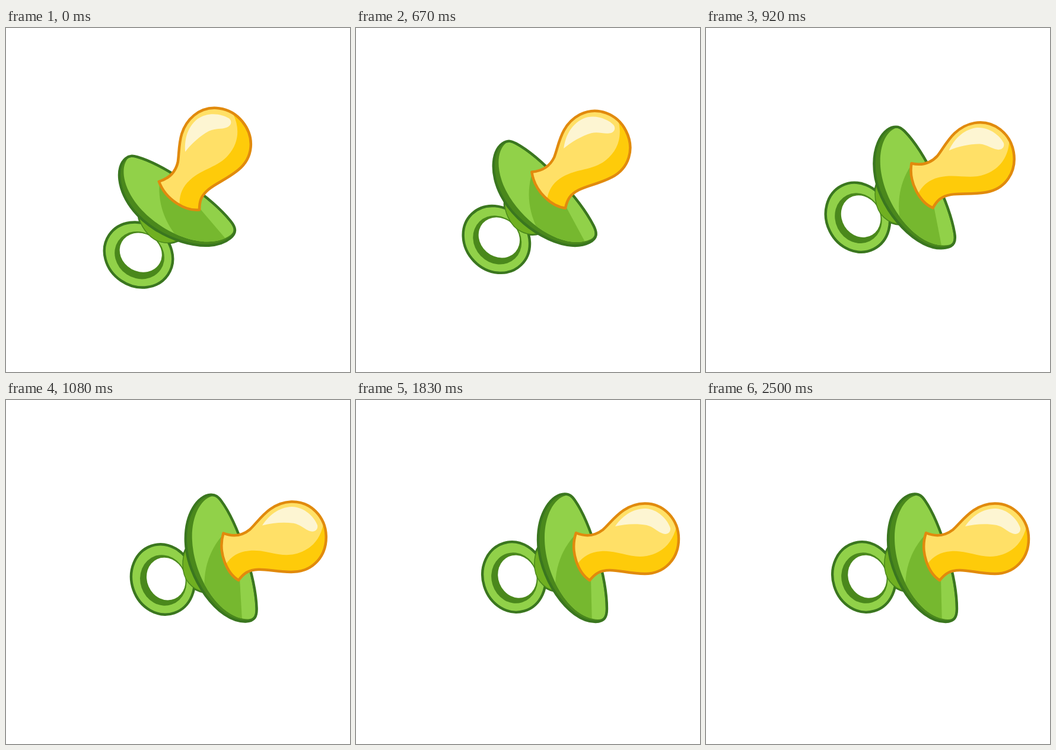
These frames come from a looping animation (580 px wide and 580 px high, 2540 ms). An HTML page:

```html
<!DOCTYPE html>
<html lang="en">
<head>
<meta charset="utf-8">
<title>Pacifier</title>
<style>
  html, body { margin: 0; width: 100%; height: 100%; overflow: hidden; background: #fff; }
  svg { display: block; width: 100vw; height: 100vh; }
  .line { fill: none; stroke: #3a761f; stroke-width: 4.4; stroke-linejoin: round; }
  .light { fill: #91d149; }
  .mid { fill: #76b82f; }
  .dark { fill: #4a881c; }
</style>
</head>
<body>
<svg viewBox="0 0 580 580">
  <defs>
    <path id="face" d="M354 161 C333 166 318 196 318 232 C318 296 360 368 408 370 C418 370 421 364 421 352 C421 300 395 209 367 170 C363 164 360 161 354 161Z"/>
    <path id="plate" d="M352 158.5 C360 158.5 364 162 369 169 C396 208 423 300 423 352 C423 366 419 374 404 374 C356 374 307 296 307 236 C307 190 330 158.5 352 158.5Z"/>
    <path id="teat" d="M371 224 C388 231 403 229 416 219 C432 205 450 175 487 174.5 C520 174.5 544 202 544 234 C544 268 520 293 487 293 C462 293 445 287 428 287 C411 287 403 293 394 304 C375 292 360 256 371 224Z"/>
    <path id="neck" d="M312 243 C298 258 297 290 310 306 C317 315 325 320 336 322"/>
    <ellipse id="ring" rx="52.6" ry="59.8" transform="translate(266.5 298.5) rotate(-17)"/>
    <clipPath id="inFace"><use href="#face"/></clipPath>
    <clipPath id="inTeat"><use href="#teat"/></clipPath>
  </defs>
  <g id="toy">
    <use href="#neck" class="line"/>
    <!-- ring -->
    <use href="#ring" class="light"/>
    <use href="#ring" class="line"/>
    <ellipse class="dark" rx="38.8" ry="43.2" transform="translate(267.3 300) rotate(-17)"/>
    <ellipse fill="#fff" rx="32" ry="36.6" transform="translate(271.9 297.8) rotate(-22)"/>
    <!-- neck -->
    <use href="#neck" fill="#70b021" stroke="#4a881c" stroke-width="1.5"/>
    <!-- shield -->
    <use href="#plate" class="dark"/>
    <use href="#face" class="light"/>
    <path class="mid" clip-path="url(#inFace)" d="M367 230 C345 255 336 285 336 315 L350 380 H398 L396 300Z"/>
    <use href="#plate" class="line"/>
    <!-- teat -->
    <use href="#teat" fill="#ffe067"/>
    <path fill="#fecb0a" clip-path="url(#inTeat)" d="M373 277 C383 263 396 256 413 255 C442 253 463 268 490 263 C517 258 534 240 540 214 L560 214 V310 H380Z"/>
    <path fill="#fdf5d2" d="M437 213 C448 197 465 183 488 183 C510 184 526 203 530 216 C531 223 525 228 517 225 C508 222 502 214 490 211 C473 208 454 209 437 213Z"/>
    <use href="#teat" fill="none" stroke="#e18a0d" stroke-width="4.5" stroke-linejoin="round"/>
  </g>
</svg>
<script>
  const LOOP = 2540, STEP = 1000 / 24, MOVE = 1250;
  const SWING = 39;
  const pivot = { x: 266.5, y: 298.5 };   // centre of the ring at rest
  const shift = { x: -43, y: 84 };        // where the ring starts from
  const toy = document.getElementById('toy');

  const bezier = (s, a, b) => 3 * (1 - s) * s * ((1 - s) * a + s * b) + s ** 3;

  // slow start, quick finish
  function ease(x) {
    if (x >= 1) return 1;
    let lo = 0, hi = 1;
    for (let i = 0; i < 24; i++) {
      const s = (lo + hi) / 2;
      if (bezier(s, 0.742, 0.6) < x) lo = s; else hi = s;
    }
    return bezier(lo, 0, 1);
  }

  function draw(ms) {
    const t = Math.floor((ms % LOOP) / STEP + 0.1) * STEP;
    const left = 1 - ease(t / MOVE);
    const x = pivot.x + shift.x * left;
    const y = pivot.y + shift.y * left;
    toy.setAttribute('transform',
      `translate(${x} ${y}) rotate(${-SWING * left}) translate(${-pivot.x} ${-pivot.y})`);
  }

  const begin = performance.now();
  function tick() {
    draw(performance.now() - begin);
    requestAnimationFrame(tick);
  }
  draw(0);
  requestAnimationFrame(tick);
</script>
</body>
</html>
```
